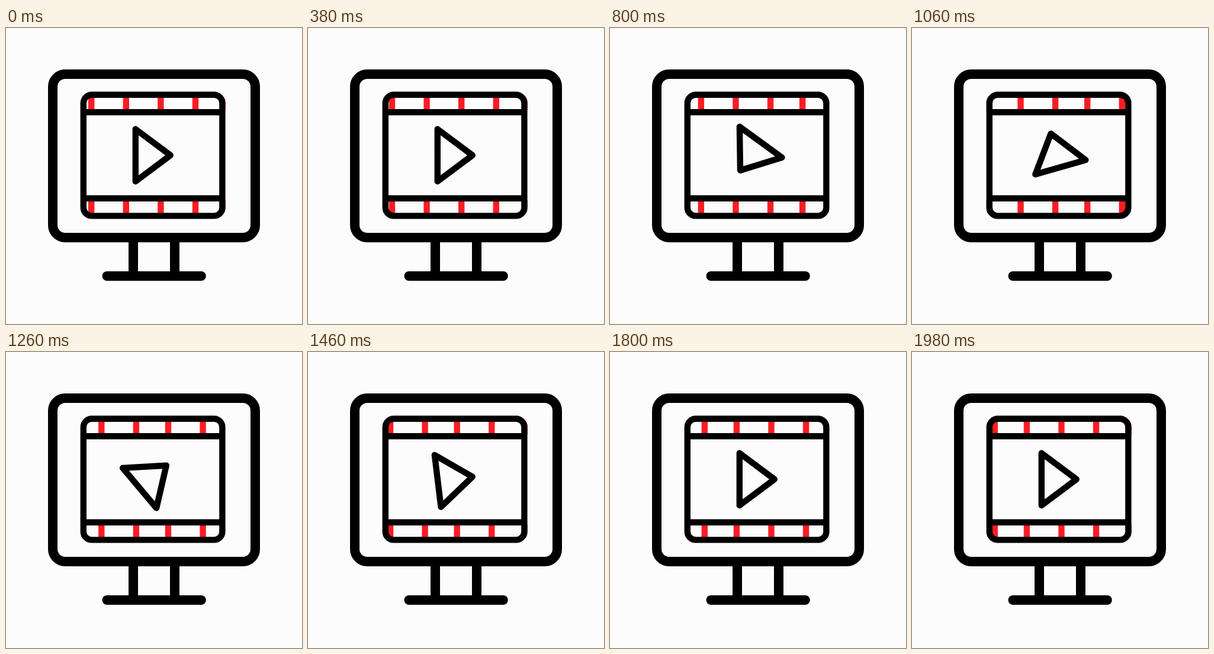
Animation, 500 px wide and 500 px high, one loop 2 s. Source, as an HTML page:

```html
<!DOCTYPE html>
<html lang="en">
<head>
<meta charset="utf-8">
<title>Video on a monitor</title>
<style>
  html, body { margin: 0; width: 100%; height: 100%; overflow: hidden; background: #fcfcfc; }
  svg { display: block; width: 100vw; height: 100vh; }
  .line { fill: none; stroke: #000; stroke-linejoin: round; }
  .thick { stroke-width: 16; }
  .thin { stroke-width: 10.4; }
</style>
</head>
<body>
<svg viewBox="0 0 500 500">
  <defs>
    <clipPath id="film"><rect x="125.6" y="107.6" width="245.3" height="215" rx="19"/></clipPath>
  </defs>

  <g class="line thick">
    <rect x="79" y="78" width="342" height="276" rx="21"/>
    <path d="M215 354V419M285 354V419"/>
    <path d="M170.5 419H329.8" stroke-linecap="round"/>
  </g>

  <g clip-path="url(#film)">
    <g id="bars" fill="#fe1c24"></g>
  </g>

  <g class="line thin">
    <rect x="130.8" y="112.8" width="234.6" height="204.6" rx="14"/>
    <path d="M131 142.2H365M131 287.7H365"/>
    <path id="play" d="M218.8 170.8L277.8 215L218.8 259.2Z"/>
  </g>
</svg>

<script>
const LOOP = 2000, HOLD = 380, STEP = 20;
const GAP = 58.6, SEAM = 54.1, PERIOD = 3 * GAP + SEAM;
const SPEED = 2.225, BAR = 10.4;
const SPIN_START = 1, SPIN_STEPS = 61.7;

const bars = document.getElementById('bars');
const play = document.getElementById('play');

// Repeating groups of four perforations on both edges of the film.
let d = '';
for (let group = -2; group < 1; group++) {
  for (let i = 0; i < 4; i++) {
    const x = 374.1 + group * PERIOD + i * GAP - BAR / 2;
    for (const y of [116, 291]) d += `M${x} ${y}h${BAR}v23h${-BAR}z`;
  }
}
bars.innerHTML = `<path d="${d}"/>`;

// Cubic bezier (.333, 0, .464, 1), solved by bisection.
function ease(x) {
  if (x <= 0) return 0;
  if (x >= 1) return 1;
  let lo = 0, hi = 1, s;
  for (let i = 0; i < 30; i++) {
    s = (lo + hi) / 2;
    const r = 1 - s;
    const bx = 3 * 0.333 * s * r * r + 3 * 0.464 * s * s * r + s * s * s;
    if (bx < x) lo = s; else hi = s;
  }
  return s * s * (3 - 2 * s);
}

function draw() {
  const t = performance.now() % LOOP;
  const k = t < HOLD ? 0 : Math.floor((t - HOLD) / STEP) + 1;
  const angle = 360 * ease((k - SPIN_START) / SPIN_STEPS);
  bars.setAttribute('transform', `translate(${-SPEED * k} 0)`);
  play.setAttribute('transform', `rotate(${angle} 242.4 213)`);
  requestAnimationFrame(draw);
}
draw();
</script>
</body>
</html>
```
